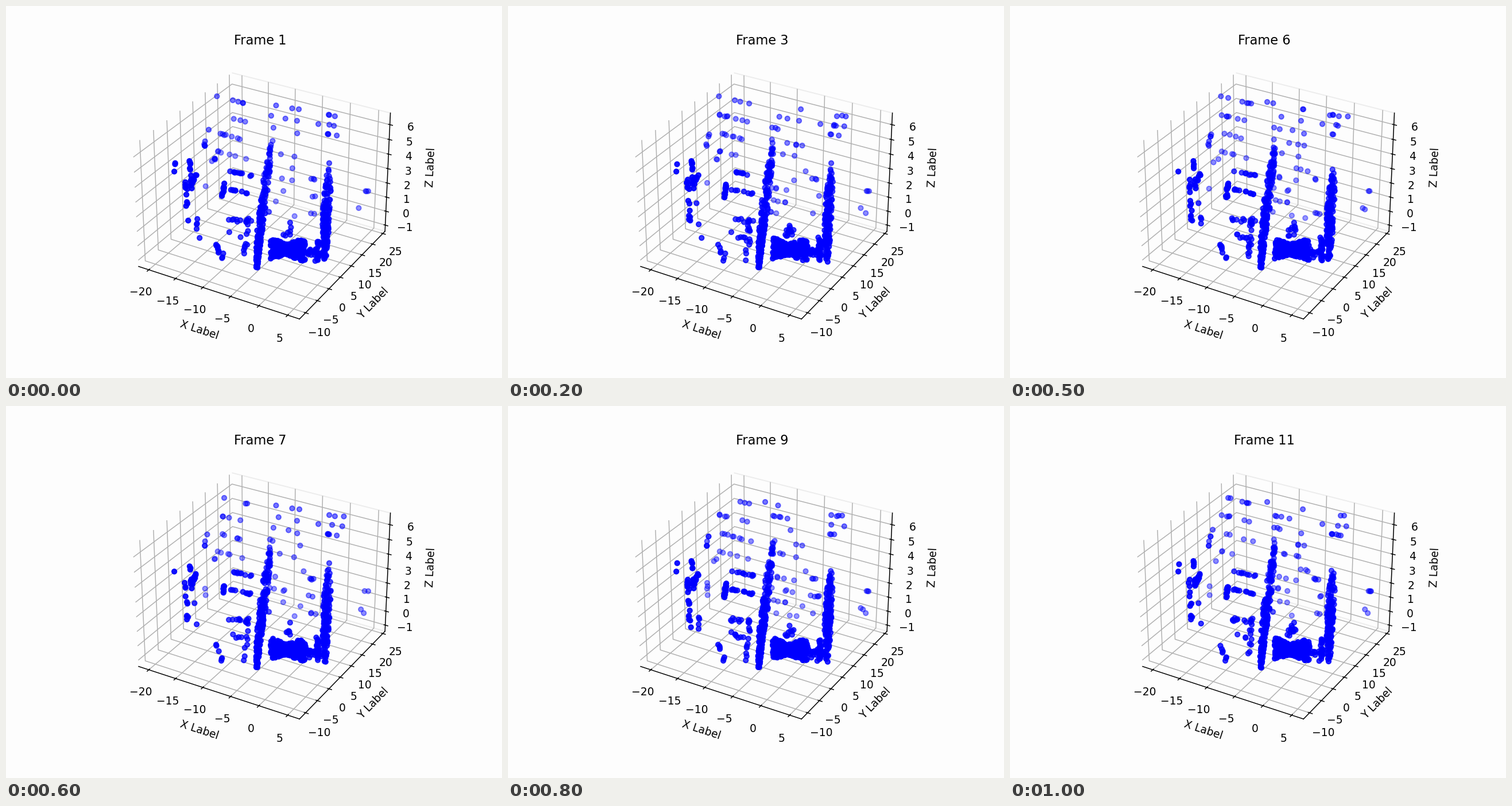
A matplotlib script that plays this animation: 864 by 648 pixels, repeating every 1100 ms.

```python
import numpy as np
import matplotlib.pyplot as plt
from matplotlib.animation import FuncAnimation

W, H, DPI = 864, 648, 135
FRAMES, STEP_MS = 11, 100
KEEP = 0.5  # share of the scene's points seen in each scan
BG = "#fdfdfd"

rng = np.random.default_rng(7)


def strip(start, end, n, alpha, spread=0.7):
    """Points scattered along a line; positions are stage pixels."""
    t = rng.random(n)[:, None]
    xy = np.array(start) + (np.array(end) - start) * t
    return np.c_[xy + rng.normal(0, spread, xy.shape), np.full(n, alpha)]


def wall(x0, x1, top, gap, count, slope, n, alphas):
    """Evenly spaced, slanted scan rows."""
    drop = slope * (x1 - x0)
    return np.vstack([
        strip((x0, top + gap * k), (x1, top + gap * k + drop), n, a)
        for k, a in enumerate(np.linspace(*alphas, count))])


def pole(base, height, lean, bend, width, n, shape, alphas):
    """Upright that leans to the right and is widest halfway up."""
    t = rng.beta(*shape, n)
    half = 1 + width * np.sin(np.pi * t)
    x = base[0] + lean * t ** bend + half * rng.uniform(-1, 1, n)
    return np.c_[x, base[1] - height * t, np.interp(t, (0, 1), alphas)]


def ground(n):
    t = rng.random(n)
    half = 14 + 4 * np.cos(2.2 * np.pi * t)
    y = 422 + 4 * t + half * rng.uniform(-1, 1, n)
    return np.c_[461 + 60 * t, y, np.full(n, 0.86)]


def build_scene():
    pts = np.vstack([
        # back walls
        wall(368, 426, 157, 32, 4, 0.26, 10, (0.52, 0.42)),
        wall(390, 428, 288, 32, 2, 0.2, 18, (0.72, 0.78)),
        wall(446, 520, 167, 21, 10, 0.2, 6, (0.54, 0.4)),
        wall(541, 590, 188, 17, 3, 0.1, 7, (0.55, 0.55)),
        wall(527, 543, 300, 30, 3, 0.2, 5, (0.5, 0.45)),
        strip((621, 322), (637, 324), 5, 0.45),
        strip((609, 346), (628, 365), 3, 0.45),
        strip((344, 250), (357, 200), 9, 0.55, 1.5),
        strip((355, 272), (368, 265), 6, 0.45),
        strip((346, 296), (348, 332), 4, 0.42),
        # posts and scraps on the left
        strip((295, 268), (291, 313), 4, 0.93),
        strip((320, 268), (323, 322), 22, 0.93),
        strip((331, 292), (324, 311), 16, 0.9),
        strip((313, 302), (316, 387), 24, 0.9, 1.2),
        strip((380, 308), (377, 334), 30, 0.93),
        strip((331, 338), (334, 400), 8, 0.8, 3),
        # floor around the left pole
        strip((384, 371), (423, 376), 20, 0.74, 2),
        strip((390, 398), (422, 410), 14, 0.74, 3),
        strip((421, 370), (414, 440), 24, 0.76, 1.5),
        strip((366, 417), (378, 443), 12, 0.8, 2),
        strip((484, 402), (498, 382), 20, 0.76, 3),
        # main structures
        pole((437, 456), 223, 26, 1.3, 5, 360, (1, 1.5), (1, 0.55)),
        pole((556, 450), 188, 9, 2, 5.5, 290, (2, 2.6), (0.86, 0.62)),
        ground(560),
        strip((522, 428), (547, 428), 44, 0.8, 5),
        strip((543, 405), (543, 444), 44, 0.8, 1),
    ])
    return pts[np.argsort(pts[:, 2], kind="stable")]


scene = build_scene()

fig = plt.figure(figsize=(W / DPI, H / DPI), dpi=DPI, facecolor=BG)
ax = fig.add_subplot(projection="3d", facecolor=BG)
ax.set(xlim=(-21.93, 7.03), ylim=(-12.51, 26.08), zlim=(-1.446, 6.78),
       xticks=range(-20, 6, 5), yticks=range(-10, 26, 5), zticks=range(-1, 7),
       xlabel="X Label", ylabel="Y Label", zlabel="Z Label")
ax.xaxis.pane.set_visible(False)
ax.zaxis.pane.set_visible(False)
ax.yaxis.set_pane_color((0.925, 0.925, 0.925, 1))
ax.yaxis.pane.set_fill(False)
title = ax.set_title("Frame 1")

# Pixel-space layer above the 3D box.
layer = fig.add_axes((0, 0, 1, 1), zorder=5)
layer.set(xlim=(0, W), ylim=(H, 0))
layer.axis("off")
dots = layer.scatter([], [], s=20)


def update(i):
    seen = scene[np.random.default_rng(i).random(len(scene)) < KEEP]
    rgba = np.zeros((len(seen), 4))
    rgba[:, 2] = 1
    rgba[:, 3] = seen[:, 2]
    dots.set_offsets(seen[:, :2])
    dots.set_facecolor(rgba)
    dots.set_edgecolor(rgba)
    title.set_text(f"Frame {i + 1}")
    return dots, title


anim = FuncAnimation(fig, update, frames=FRAMES, interval=STEP_MS,
                     repeat=True, repeat_delay=0, blit=False)
plt.show()
```
